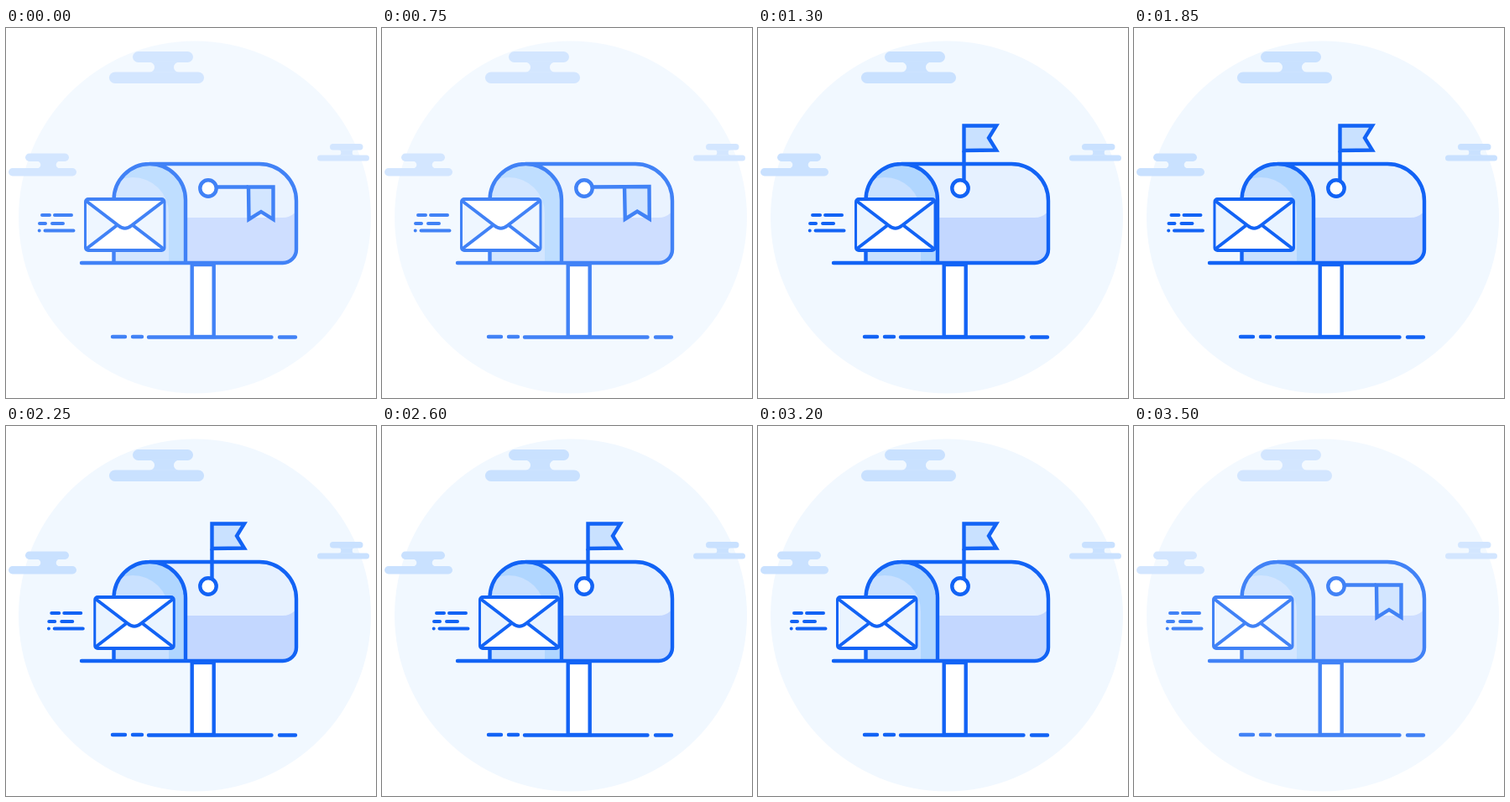
These frames come from a looping animation (441x441 px, 3.55 s). An HTML page:

```html
<!DOCTYPE html>
<html lang="en">
<head>
<meta charset="utf-8">
<title>Mailbox</title>
<style>
  html, body { margin: 0; width: 100%; height: 100%; overflow: hidden; background: #fff; }
  svg { display: block; width: 100%; height: 100%; }
  .line { fill: none; stroke: #1263f5; stroke-width: 4.4; }
  .round { stroke-linecap: round; stroke-linejoin: round; }
  .thin { stroke-width: 4; }
  .white { fill: #fff; }
  .pale { fill: #c9e1ff; }
</style>
</head>
<body>
<svg viewBox="0 0 441 441">
  <defs>
    <path id="front" d="M128.5 280V205a42.75 43 0 0 1 85.5 0V280Z"/>
    <path id="body" d="M171 162H302a44 44 0 0 1 44 44V264a16 16 0 0 1-16 16H214Z"/>
    <clipPath id="frontClip"><use href="#front"/></clipPath>
    <clipPath id="bodyClip"><use href="#body"/></clipPath>
  </defs>
  <g id="scene">
    <circle cx="225" cy="225.5" r="210" fill="#f1f8ff"/>
    <g id="clouds" class="pale"></g>

    <!-- Mailbox -->
    <use href="#body" fill="#c3d7ff"/>
    <path d="M160 150H350V206a20 20 0 0 1-20 20H160Z" fill="#e6f1ff" clip-path="url(#bodyClip)"/>
    <use href="#front" fill="#b0d6ff"/>
    <path d="M108 280V221a43 43 0 0 1 86 0V280Z" class="pale" clip-path="url(#frontClip)"/>
    <rect x="221.7" y="282" width="26" height="86" class="line white"/>
    <path class="line round" d="M90 280H330a16 16 0 0 0 16-16V206a44 44 0 0 0-44-44H171M128.5 280V205a42.75 43 0 0 1 85.5 0V280"/>
    <path class="line round" d="M127 368H142M151 368H162M170 368.5H316.5M326 368.5H345"/>

    <!-- Flag -->
    <g id="flag" class="line">
      <path d="M245.5 189.5H288.5"/>
      <path class="pale" d="M289 189.5H318.5V228L304 219L289.5 228Z"/>
    </g>
    <circle cx="241" cy="191" r="9.7" class="line white"/>

    <!-- Letter with speed lines -->
    <g id="letter" class="line round thin">
      <rect x="95" y="204" width="93.5" height="61" rx="3" class="white"/>
      <path d="M96 207L132.500 235L96 263ZM187.500 207L151 235L187.500 263Z" fill="#eaf4ff" stroke="none"/>
      <path d="M96 206.500L134 235.500Q141.700 242 149.500 235.500L187.500 206.500M96 263L132.500 235M187.500 263L151 235"/>
      <path d="M43 223H52M58 223H78M40 233H47M55 233H68M39.700 241.500h.01M46.500 241.500H80.500"/>
    </g>
  </g>
</svg>
<script>
  const LOOP = 3550, ENTER = 750, LEAVE = 3275, TURN = 225, FADE = 200;
  const SWING = 1200, REACH = 22.4, SWING_END = ENTER + 2 * SWING;
  const el = id => document.getElementById(id);
  const scene = el('scene'), flag = el('flag'), letter = el('letter');

  const bar = (x1, y1, x2, y2) =>
    `<rect x="${x1}" y="${y1}" width="${x2 - x1}" height="${y2 - y1}" rx="${(y2 - y1) / 2}"/>`;

  // Two rounded bars joined by a neck with concave sides
  function cloud(top, bottom, neckLeft, neckRight) {
    const y1 = top[3] - .3, y2 = bottom[1] + .3, r = (y2 - y1) / 2;
    return bar(...top) + bar(...bottom) +
      `<path d="M${neckLeft} ${y1}A${r} ${r} 0 0 1 ${neckLeft} ${y2}H${neckRight}A${r} ${r} 0 0 1 ${neckRight} ${y1}Z"/>`;
  }
  el('clouds').innerHTML =
    cloud([151, 28, 223, 41], [123, 52.5, 236, 66], 171, 206) +
    cloud([23, 149.5, 75, 159], [3, 167, 84, 176.5], 37, 64) +
    cloud([386, 138, 425.5, 145.5], [371, 151.5, 433, 158.5], 396, 416);

  const ramp = (t, start, length) => Math.min(1, Math.max(0, (t - start) / length));

  function draw(t) {
    const raised = ramp(t, ENTER, TURN) - ramp(t, LEAVE, TURN);
    const active = ramp(t, ENTER, FADE) - ramp(t, LEAVE - 50, FADE);
    const swinging = t > ENTER && t < SWING_END;
    const shift = swinging ? REACH / 2 * (1 - Math.cos(2 * Math.PI * (t - ENTER) / SWING)) : 0;
    scene.setAttribute('opacity', .8 + .2 * active);
    flag.setAttribute('transform', `rotate(${-90 * raised} 245.5 189.5)`);
    letter.setAttribute('transform', `translate(${shift} 0)`);
  }

  const start = performance.now();
  function tick() {
    draw((performance.now() - start) % LOOP);
    requestAnimationFrame(tick);
  }
  tick();
</script>
</body>
</html>
```
